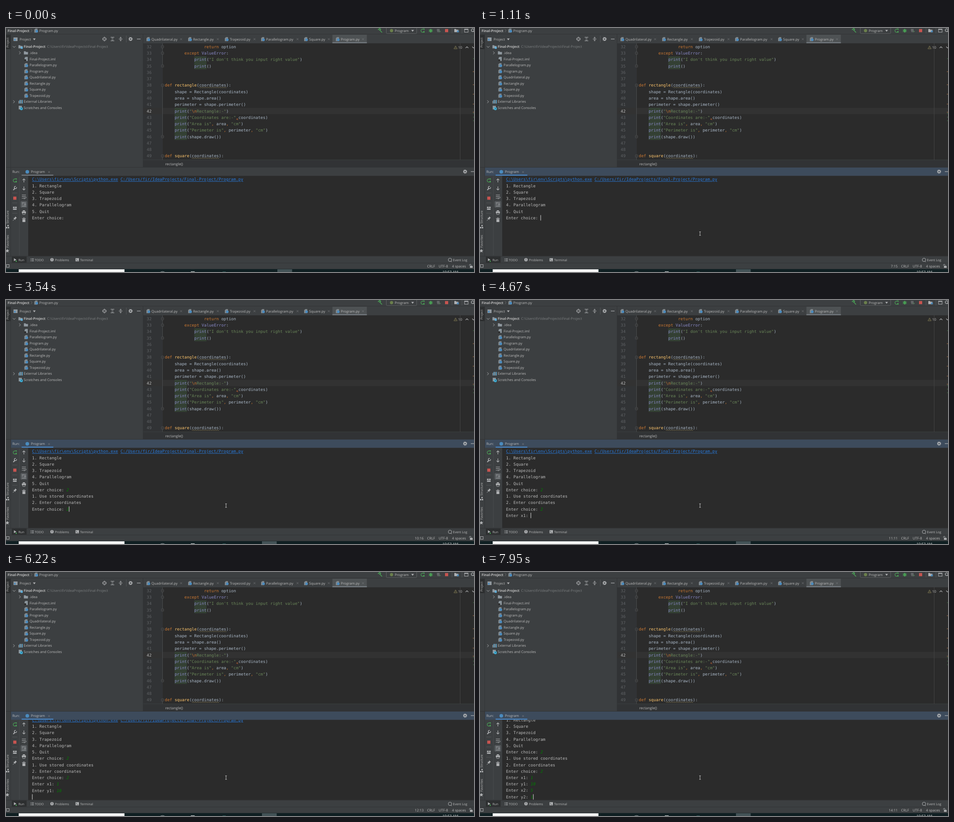
Animation, 1033 px wide and 542 px high, one loop 8000 ms. Source, as an HTML page:

```html
<!DOCTYPE html>
<html lang="en">
<head>
<meta charset="utf-8">
<title>IDE console session</title>
<style>
  html, body { margin: 0; width: 100%; height: 100%; overflow: hidden; background: #3c3f41; }
  svg { display: block; }
  text { font: 7.7px "Open Sans", "Noto Sans", sans-serif; fill: #bbb; white-space: pre; text-rendering: geometricPrecision; }
  .mono { font: 9px "DejaVu Sans Mono", "Noto Sans Mono", monospace; }
  .bold { font-weight: 700; }
  .small { font-size: 7px; }
  .side { font-size: 6.75px; }
  .dim { fill: #7d8082; }
  .code { fill: #a9b7c6; }
  .num { fill: #606366; }
  .kw { fill: #cc7832; }
  .str { fill: #6a8759; }
  .fn { fill: #ffc66d; }
  .std { fill: #8888c6; }
  .link { fill: #287bde; text-decoration: underline; }
  .in { fill: #007f00; font-style: italic; }
</style>
</head>
<body>
<svg id="stage" width="1033" height="542" viewBox="0 0 1033 542" xmlns="http://www.w3.org/2000/svg"></svg>
<script>
const LOOP = 8000, CW = 5.418, PITCH = 14.24;
const GREY = '#afb1b3', GREEN = '#499c54', RED = '#c75450', BLUE = '#4b8bbe';
const out = [];
const add = s => out.push(s);
const rect = (x, y, w, h, fill, more = '') => add(`<rect x="${x}" y="${y}" width="${w}" height="${h}" fill="${fill}" ${more}/>`);
const path = (d, stroke = GREY, w = 1, fill = 'none', more = '') =>
  add(`<path d="${d}" stroke="${stroke}" stroke-width="${w}" fill="${fill}" ${more}/>`);
const shape = (d, fill = GREY) => path(d, 'none', 0, fill);
const dot = (x, y, r, fill) => add(`<circle cx="${x}" cy="${y}" r="${r}" fill="${fill}"/>`);
const ring = (x, y, r, stroke = GREY, w = 1) => add(`<circle cx="${x}" cy="${y}" r="${r}" fill="none" stroke="${stroke}" stroke-width="${w}"/>`);
// y is the middle of the capitals
const label = (x, y, s, cls = '', more = '') => add(`<text x="${x}" y="${y + 2.75}" class="${cls}" ${more}>${s}</text>`);
const monoText = (x, y, s, cls) => `<text x="${x}" y="${y + 3.2}" class="mono ${cls}">${s}</text>`;

const down = (x, y) => shape(`M${x - 3} ${y - 1.6}h6l-3 4z`);
const cross = (x, y) => path(`M${x - 2} ${y - 2}l4 4m0-4l-4 4`, '#75787a', .8);
const chevron = (x, y) => path(`M${x - 1.5} ${y - 3}l3 3l-3 3`, GREY, 1);
const gear = (x, y) => { ring(x, y, 2.5, GREY, 1.8); add(`<circle cx="${x}" cy="${y}" r="3.9" fill="none" stroke="${GREY}" stroke-width="1.3" stroke-dasharray="1.53"/>`); };
const minus = (x, y) => path(`M${x - 4} ${y}h8`, GREY, 1.2);
const folder = (x, y, c = '#9099a0') => shape(`M${x - 4.5} ${y - 3.5}h3.5l1.3 1.5h4.2v5.5h-9z`, c);
const pyFile = (x, y) => { shape(`M${x - 1.5} ${y - 4.5}h4.5v9h-7v-6.5z`, '#7f888e'); dot(x + 1.5, y + 1.3, 2.9, BLUE); };
const rerun = (x, y) => {
  path(`M${x + 2} ${y - 2.6}a3.5 3.5 0 1 0 1.4 3.4`, GREEN, 1.3);
  shape(`M${x + .8} ${y - 4.6}h3.6v3.8z`, GREEN);
  rect(x + 1.4, y + 1.4, 3, 3, GREEN);
};

function topBar() {
  label(3.5, 5.8, 'Final-Project', 'bold');
  path('M55 2.5l2.5 3.3l-2.5 3.3', '#777', .8);
  pyFile(66.5, 5.8);
  label(73.5, 5.8, 'Program.py');
  path('M821 4l4-3l2 2l-3 2.5M824.5 4l5.5 6', GREEN, 1.8);
  rect(839.5, -2, 67, 14.5, 'none', 'stroke="#5e6163" rx="2"');
  dot(851, 5.8, 3.6, '#6a7f4c');
  label(858, 5.8, 'Program');
  down(897.5, 5.8);
  rerun(919.5, 5.8);
  add(`<ellipse cx="937.5" cy="6" rx="2.6" ry="4" fill="${GREEN}"/>`);
  path('M933 3.5l9 5M933 8.5l9-5M933 6h9', GREEN, .9);
  shape('M951 2h6v4l-3 4q-3-2-3-5z', '#626567');
  shape('M956 5l4 2.5l-4 2.7z', '#55705a');
  rect(969, 2.3, 7, 7, RED);
  path('M984.5 0v12', '#515456');
  folder(994, 5.8, GREY);
  rect(995.5, 5.5, 4, 4, BLUE);
  path('M1006.5 0v12', '#515456');
  rect(1012, 2.3, 8, 7, 'none', `stroke="${GREY}"`);
  path('M1012 3.3h8', GREY, 1.6);
  ring(1030, 4.8, 3, GREY, 1.2);
  path('M1032 7l2 2.5', GREY, 1.2);
  rect(0, 13, 1033, 1, '#323436');
}

function sideStripe() {
  const side = (y, s) => add(`<text class="side" transform="translate(6.2 ${y}) rotate(-90)">${s}</text>`);
  rect(0, 15, 10, 32, '#2d2f30');
  rect(10, 14, 1, 493, '#323436');
  side(43.3, 'Project');
  side(434.5, 'Structure');
  side(488, 'Favorites');
  rect(0, 442, 3, 3, GREY); rect(4, 442, 3, 3, GREY); rect(3, 437.5, 3, 3, GREY);
  shape('M3 490.5l1.2 2.8l3 .3l-2.2 2l.7 3l-2.7-1.6l-2.7 1.6l.7-3l-2.2-2l3-.3z');
}

function projectPanel() {
  rect(16.5, 21, 9, 8, '#9099a0');
  rect(18, 24, 3, 4, BLUE);
  label(30, 25, 'Project');
  down(62.5, 24.8);
  ring(217.3, 24.5, 3.8); path('M217.3 19.5v4m0 2v4M212.3 24.5h4m2 0h4');
  path('M231 20.5h8M231 28.5h8M233 23.7l2-1.6l2 1.6M233 25.5l2 1.6l2-1.6');
  path('M249 24.5h8M253 19.5v3M253 26.5v3M251 21l2 2l2-2M251 28l2-2l2 2');
  path('M265.5 17v15', '#515456');
  gear(275, 24.5); minus(293, 24.5);

  const row = i => 41.7 + 13.56 * i;
  path('M15 40.3l3 3l3-3');
  folder(32, row(0)); rect(32.5, row(0), 4.5, 4.5, '#62b0d9');
  label(39, row(0), 'Final-Project', 'bold');
  label(90.7, row(0), 'C:\\Users\\fir\\IdeaProjects\\Final-Project', 'dim');
  chevron(30.5, row(1)); folder(44, row(1)); label(52, row(1), '.idea');
  shape(`M43 ${row(2) - 4.5}h5v9h-7v-7z`, '#8b959c');
  rect(40.5, row(2) + .8, 4, 4, '#2b2b2b');
  label(52, row(2), 'Final-Project.iml');
  ['Parallelogram', 'Program', 'Quadrilateral', 'Rectangle', 'Square', 'Trapezoid'].forEach((s, i) => {
    pyFile(44.5, row(i + 3));
    label(52, row(i + 3), s + '.py');
  });
  chevron(17.5, row(9));
  for (let i = 0; i < 4; i++) rect(27.5 + i * 2.5, row(9) - (i ? 4 : 2), 1.7, i ? 8 : 6, i % 2 ? '#62b0d9' : '#9099a0');
  label(39, row(9), 'External Libraries');
  shape(`M28 ${row(10) - 4.5}h7v8h-7z`, '#8b959c');
  dot(34, row(10) + 2, 3.2, '#40b6e0');
  path(`M34 ${row(10)}v2.2h1.6`, '#2b2b2b', .8);
  label(39, row(10), 'Scratches and Consoles');
}

const CODE = [
  '                return option',
  '        except ValueError:',
  '            print("I don\'t think you input right value")',
  '            print()', '', '',
  'def rectangle(coordinates):',
  '    shape = Rectangle(coordinates)',
  '    area = shape.area()',
  '    perimeter = shape.perimeter()',
  '    print("\\nRectangle:-")',
  '    print("Coordinates are:-",coordinates)',
  '    print("Area is", area, "cm")',
  '    print("Perimeter is", perimeter, "cm")',
  '    print(shape.draw())', '', '',
  'def square(coordinates):',
];
const span = (cls, s) => `<tspan class="${cls}">${s}</tspan>`;
const paint = line => line.replace(/("[^"]*")|\b(def|return|except)\b|(,)|\b(print|ValueError)\b|(\w+)(?=\(coordinates\):)/g,
  (m, str, kw, comma, std) =>
    str ? span('str', str.replace('\\n', span('kw', '\\n'))) :
    kw || comma ? span('kw', m) : span(std ? 'std' : 'fn', m));

function editor() {
  rect(302, 14, 1, 295, '#323436');
  [['Quadrilateral', 314, 386.5], ['Rectangle', 406, 467.5], ['Trapezoid', 487, 548.5],
   ['Parallelogram', 567, 643.5], ['Square', 662, 712.5], ['Program', 732, 788]].forEach(([s, x, end]) => {
    if (s === 'Program') { rect(720.5, 15, 76, 19, '#4e5254'); rect(720.5, 31.5, 76, 2.3, '#747a80'); }
    pyFile(x, 24.8);
    label(x + 7, 24.8, s + '.py');
    cross(end, 24.8);
  });
  const left = 350.5, row = i => 41.6 + 14.275 * i;
  rect(303, 34, 730, 259, '#2b2b2b');
  rect(303, 34, 43, 259, '#313335');
  rect(303, row(10) - 7, 730, 14, '#323232');
  path('M1002.5 34v259', '#424242');
  path('M345.5 34V84M345.5 127V241M345.5 284V293', '#4b4d4f');
  CODE.forEach((line, i) => {
    const y = row(i), p = line.indexOf('print');
    add(monoText(310.6, y, 32 + i, i === 10 ? '' : 'num'));
    if (p >= 0) rect(left + p * CW, y - 7.1, 5 * CW, 14.3, '#344134');
    add(monoText(left, y, paint(line), 'code'));
    if (line.startsWith('def')) {
      const x = left + (line.indexOf('(') + 1) * CW;
      path(`M${x} ${y + 5}` + 'q1 -1.6 2 0t2 0'.repeat(15), '#8f8460', .8);
    }
  });
  [0, 1, 3, 6, 14, 17].forEach(i => {
    const y = row(i);
    rect(343, y - 2.7, 5, 5.4, '#2b2b2b', 'stroke="#585b5e" stroke-width=".8" rx="1"');
    path(`M344 ${y}h3`, '#585b5e', .8);
  });
  path(`M508.5 ${row(11) + 4.5}q1 -1.6 2 0t2 0`, '#d0603a', 1);
  path('M992.3 39.8l3.6 6.4h-7.2z', '#857d55', .9);
  path('M992.3 42v2m0 .6v1', '#857d55', .8);
  label(998, 43, '10');
  path('M1014.5 44.5l3-3l3 3M1029 41.5l3 3l3-3', GREY, 1.1);
  [97, 126, 147, 169, 187].forEach(y => rect(1030.5, y - .6, 2.5, 1.2, '#9a6a45'));
  [68, 190, 198, 206].forEach(y => rect(1031, y - .6, 2, 1.2, '#3f6a45'));
  rect(303, 293, 730, 16, '#313335');
  rect(303, 292.5, 730, .8, '#3f4244');
  label(351.5, 302, 'rectangle()', '', 'style="font-size:8px"');
}

function runPanel() {
  rect(0, 309, 1033, 1, '#323436');
  rect(11, 310, 1022, 18.5, '#3c3f41', 'id="head"');
  label(14, 319.5, 'Run:');
  dot(47, 319.5, 4, BLUE);
  label(55, 319.5, 'Program');
  cross(95, 320);
  rect(34.5, 325.8, 70, 2.2, '#747a80', 'id="tabLine"');
  gear(1013.3, 319); minus(1030, 319);
  rect(11, 328.5, 38, 178, '#3c3f41');
  path('M29.5 330v175', '#4c4f51', .8);
  rect(49, 328.5, 984, 178, '#2b2b2b');

  rerun(19.5, 338.5);
  path('M16 360l4.2-4.2', GREY, 2); path('M23.4 353.6a2.6 2.6 0 1 1-1.8-1.8', GREY, 1.4);
  path('M14 366.5h11', '#515456');
  rect(16, 374.5, 7, 7, RED);
  path('M14 388.5h11', '#515456');
  rect(15.5, 397, 3.6, 3, GREY); rect(20, 397, 3.6, 3, GREY); rect(15.5, 401, 8, 2.8, GREY);
  path('M14 411.5h11', '#515456');
  shape('M20.5 418.5l3.5 3.5l-1.5.6l-1.8 1.8l-.3 2.2l-4.3-4.3l2.2-.3l1.8-1.8z'); path('M18 425l-2.7 2.7');
  path('M39.5 343v-8M36.5 338l3-3l3 3M39.5 352v8M36.5 357l3 3l3-3', GREY, 1.2);
  path('M35 371h9M35 374.5h7.5a1.8 1.8 0 0 1 0 3.8h-3M35 378.3h2.5M40.8 376.3l-2 2l2 2');
  rect(32, 384.5, 14.5, 14.5, '#55595c', 'rx="2"');
  path('M35 388h5M35 391h3.5M35 395.5h9M42 387v6M40 391.3l2 2l2-2');
  rect(37, 405, 5, 2, GREY); rect(35, 407.5, 9, 4, GREY); rect(37, 410.5, 5, 3.5, '#3c3f41', `stroke="${GREY}" stroke-width=".9"`);
  rect(35.5, 422.5, 8, 1.3, GREY); rect(38, 421.3, 3, 1.2, GREY); rect(36.3, 424.6, 6.4, 6.4, GREY);
}

function footer() {
  rect(0, 506.5, 1033, 1, '#323436');
  rect(13, 507.5, 32.5, 14, '#2d2f30');
  shape('M17.5 511.5l5.5 3.3l-5.5 3.3z', GREY); dot(22.5, 518, 1.6, GREEN);
  label(27.5, 515.5, 'Run', 'small');
  path('M54 512.5h1.5m1 0h5M54 515h1.5m1 0h5M54 517.5h1.5m1 0h5');
  label(63.5, 515.5, 'TODO', 'small');
  dot(101.5, 514.8, 3.7, GREY); path('M101.5 512.3v3m0 1v1', '#3c3f41', 1.1);
  label(108, 515.5, 'Problems', 'small');
  rect(153.5, 511.3, 7.5, 7, GREY); path('M155 513l1.7 1.6l-1.7 1.6M157.3 516.7h2.3', '#3c3f41', .9);
  label(163.7, 515.5, 'Terminal', 'small');
  ring(980, 515, 3.8); path('M982 518l2 2', GREY, 1);
  label(986.5, 515.5, 'Event Log', 'small');
  rect(0, 521.5, 1033, 1, '#323436');
  rect(1, 525.5, 6, 6, 'none', `stroke="${GREY}"`);
  label(922, 528.8, '', '', 'id="pos" text-anchor="end"');
  label(929.5, 528.8, 'CRLF');
  label(955, 528.8, 'UTF-8');
  label(984.5, 528.8, '4 spaces');
  rect(1024, 528.5, 6, 4.2, GREY); path('M1023 528v-1.4a1.7 1.7 0 0 1 3.4 0v2', GREY, 1);

  rect(0, 535.5, 1033, 7, '#0f1f22');
  rect(28, 536, 233.5, 6, '#f6f6f6');
  rect(599, 536, 32.5, 6, '#435357', 'id="task"');
  path('M340.5 542.5q5-3 10 0', '#9ba4a6', 1.2);
  rect(408, 540.8, 8.5, 1.2, '#d5d9da');
  rect(478, 541, 7, 1, '#35605f');
  label(963.5, 541.9, '10:53 AM', '', 'style="fill:#e4e4e4;font-size:8px"');
}

topBar(); sideStripe(); projectPanel(); editor(); runPanel(); footer();
add('<clipPath id="view"><rect x="49" y="328.5" width="984" height="178"/></clipPath>');
add('<g clip-path="url(#view)"><g id="console"></g></g><g id="pointer"></g>');
const stage = document.getElementById('stage');
stage.innerHTML = out.join('');
const [head, tabLine, pos, task, consoleBox, pointer] =
  ['head', 'tabLine', 'pos', 'task', 'console', 'pointer'].map(id => document.getElementById(id));

// Console rows: text, time of printing, typed keys with their times
const ROWS = [
  ['1. Rectangle'], ['2. Square'], ['3. Trapezoid'], ['4. Parallelogram'], ['5. Quit'],
  ['Enter choice: ', 0, [[1780, '2']]],
  ['1. Use stored coordinates', 2410],
  ['2. Enter coordinates', 2410],
  ['Enter choice: ', 2410, [[3440, '2']]],
  ['Enter x1: ', 4560, [[4880, '1']]],
  ['Enter y1: ', 5360, [[5720, '1'], [5840, '0']]],
  ['Enter x2: ', 6450, [[6870, '5']]],
  ['Enter y2: ', 7390, [[7950, '1']]],
];
// Caret: time, row, column; no row means hidden
const CARET = [
  [0], [1020, 6, 14], [1520], [1780, 6, 15], [2180, 7, 0], [2410, 9, 14], [2990], [3440, 9, 15], [4000],
  [4330, 10, 0], [4560, 10, 10], [4880, 10, 11], [5160, 11, 0], [5360, 11, 10], [5720, 11, 11], [5840, 11, 12],
  [6220, 12, 0], [6450, 12, 10], [6870, 12, 11], [7190, 13, 0], [7390, 13, 10], [7950, 13, 11],
];
const POS = [
  [0, ''], [1110, '7:15'], [1910, '7:16'], [2300, '8:1'], [2530, '10:15'], [3540, '10:16'], [4440, '11:1'],
  [4670, '11:11'], [5000, '11:12'], [5260, '12:1'], [5470, '12:11'], [5780, '12:12'], [5990, '12:13'],
  [6330, '13:1'], [6560, '13:11'], [6990, '13:12'], [7290, '14:1'], [7500, '14:11'],
];
const SCROLL = [[0, 0], [6220, 7.5], [7190, 21.8]];
const at = (list, t) => list.findLast(e => e[0] <= t);

function consoleMarkup(t) {
  const x = 57.6, y = i => 336.2 + PITCH * i - at(SCROLL, t)[1];
  let s = monoText(x, y(0), 'C:\\Users\\fir\\env\\Scripts\\python.exe', 'link') +
    monoText(x + 36 * CW, y(0), 'C:/Users/fir/IdeaProjects/Final-Project/Program.py', 'link');
  ROWS.forEach(([text, shown = 0, keys = []], i) => {
    if (t < shown) return;
    const typed = keys.filter(k => k[0] <= t).map(k => k[1]).join('');
    s += monoText(x, y(i + 1), text, '') + monoText(x + text.length * CW, y(i + 1), typed, 'in');
  });
  const [, row, col] = at(CARET, t);
  if (row) s += `<rect x="${x + col * CW - .1}" y="${y(row) - 6}" width="1.2" height="12" fill="#c4c4c4"/>`;
  return s;
}

const ease = p => p * p * (3 - 2 * p);
const clamp = p => Math.min(1, Math.max(0, p));

function pointerMarkup(t) {
  if (t < 130) return '';
  const a = clamp((t - 130) / 120), b = ease(clamp((t - 580) / 380));
  const x = 967 - 258 * a - 223.3 * b, y = 531 - 26.5 * a - 47.8 * b;
  const halo = t >= 980 && t < 1080 ? `<circle cx="${x - 1.3}" cy="${y - .4}" r="8" fill="#a19d10"/>` : '';
  return halo + (y > 506.5
    ? `<path d="M${x} ${y}v10l2.3-2.1l1.6 3.6l1.6-.7l-1.6-3.5h3.2z" fill="#fff" stroke="#111" stroke-width=".6"/>`
    : `<path d="M${x - 1.8} ${y - 4}h3.6M${x - 1.8} ${y + 4}h3.6M${x} ${y - 4}v8" stroke="#d0d0d0" stroke-width=".9"/>`);
}

function update(el, s) {
  if (el.last !== s) el.innerHTML = el.last = s;
}

function frame() {
  const t = performance.now() % LOOP, focused = t >= 1050;
  head.setAttribute('fill', focused ? '#3d4b5c' : '#3c3f41');
  tabLine.setAttribute('fill', focused ? '#4a88c7' : '#747a80');
  task.setAttribute('x', t >= 1080 ? 565 : 599);
  update(pos, at(POS, t)[1]);
  update(consoleBox, consoleMarkup(t));
  update(pointer, pointerMarkup(t));
  requestAnimationFrame(frame);
}
frame();
</script>
</body>
</html>
```
